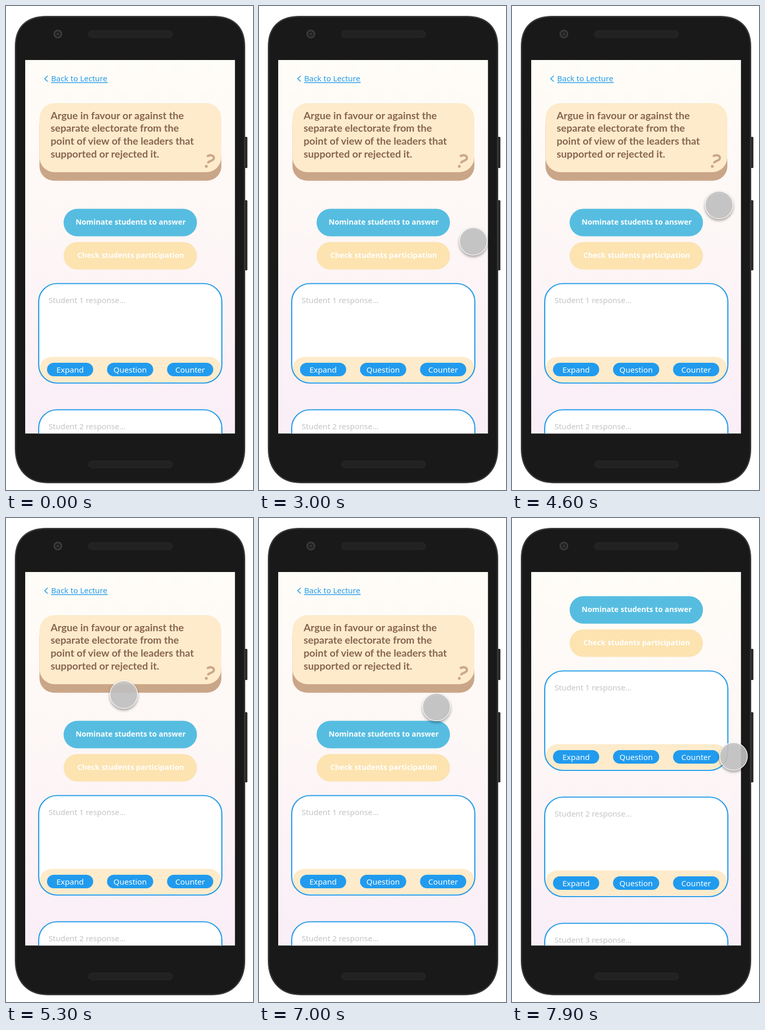
Write an HTML page that moves like this. It is 476 px wide and 932 px high and loops after 8 s.

```html
<!DOCTYPE html>
<html lang="en">
<head>
<meta charset="utf-8">
<title>Lecture question</title>
<style>
  html, body { margin: 0; width: 100%; height: 100%; overflow: hidden; background: #fff; }
  svg { display: block; width: 476px; height: 932px; }
  text { font-family: "Noto Sans", sans-serif; font-size: 15px; }
  .ask { font-family: Lato, sans-serif; font-size: 19.55px; font-weight: 700; fill: #886550; }
  .bold { font-size: 14.25px; font-weight: 700; }
  .mid { text-anchor: middle; fill: #fff; }
  .hint { fill: #c4c4c4; }
  .link { fill: #229bea; }
  #dot { filter: drop-shadow(0 3px 2.5px rgba(0, 0, 0, .4)); }
</style>
</head>
<body>
<svg viewBox="0 0 476 932">
  <defs>
    <linearGradient id="sky" x1="0" y1="0" x2="0" y2="1">
      <stop offset="0" stop-color="#fffdf8"/>
      <stop offset=".5" stop-color="#fdf6f6"/>
      <stop offset="1" stop-color="#faeef7"/>
    </linearGradient>
    <clipPath id="view"><rect x="37" y="104" width="404.5" height="719.3"/></clipPath>
  </defs>

  <g fill="#292929">
    <rect x="456" y="252" width="9.2" height="60" rx="1.5"/>
    <rect x="456" y="374" width="9.2" height="135" rx="1.5"/>
  </g>
  <path fill="#191919" stroke="#383838" stroke-width="2.4"
    d="M78 20.2H400C438 20.2 459.8 40 459.8 78V852C459.8 893 436 917.8 398 917.8H80C42 917.8 18.2 893 18.2 852V78C18.2 40 40 20.2 78 20.2Z"/>
  <g fill="#222" stroke="#2a2a2a">
    <rect x="159" y="47.5" width="162" height="13.5" rx="6.7"/>
    <rect x="159" y="876" width="162" height="13.5" rx="6.7"/>
  </g>
  <circle cx="100" cy="54" r="7" fill="#202020" stroke="#3b3b3b" stroke-width="3"/>
  <circle cx="100" cy="54" r="2.6" fill="#343434"/>

  <g clip-path="url(#view)">
    <rect x="37" y="104" width="404.5" height="720" fill="url(#sky)"/>
    <g id="page"></g>
  </g>
  <circle id="dot" r="26.7" fill="#c9c8c8" fill-opacity=".87" stroke="#fff" stroke-width="1.2"/>
</svg>
<script>
  const LOOP = 8000, STEP = 100, ENTER = 2800, SCROLL = 7700;
  const $ = id => document.getElementById(id);
  const page = $("page"), dot = $("dot");

  const box = (x, y, w, h, r, fill, more = "") =>
    `<rect x="${x}" y="${y}" width="${w}" height="${h}" rx="${r}" fill="${fill}" ${more}/>`;
  const text = (cls, x, y, s) => `<text class="${cls}" x="${x}" y="${y}">${s}</text>`;

  const back = `<path d="M80.5 134.5L74.5 140L80.5 145.5M87 147.5H196"
    fill="none" stroke="#229bea" stroke-width="1.6"/>` + text("link", 87, 145.4, "Back to Lecture");

  const lines = [
    "Argue in favour or against the",
    "separate electorate from the",
    "point of view of the leaders that",
    "supported or rejected it."
  ];
  const question =
    box(64.5, 200, 350.5, 136.5, 28, "#caa688") +
    box(64.5, 187, 350.5, 133, 29, "#fdebcb") +
    lines.map((s, i) => text("ask", 86, 217.5 + i * 24.7, s)).join("") +
    `<path d="M387.5 290C392 285.5 402 287 400.5 293.5C399 299.5 390 297 389.2 303"
      fill="none" stroke="#caa688" stroke-width="4.2"/>
     <circle cx="386" cy="308.8" r="2.8" fill="#caa688"/>`;

  const button = (y, fill, s) =>
    box(111, y, 257, 53, 26.5, fill) + text("bold mid", 240.3, y + 30.4, s);

  const pill = (s, i) => {
    const x = 79 + i * 115.7;
    return box(x, 153, 89, 26, 13, "#219bee") + text("mid", x + 44.5, 171.5, s);
  };

  const card = n => `<g transform="translate(0 ${291 + n * 243})">` +
    box(63, 0.5, 353, 191.5, 35, "#fff") +
    `<path d="M65 163Q67 141.5 92 141.5H388Q412 141.5 414.5 163Q412 190.5 381 190.5H98Q67 190.5 65 163Z" fill="#fdebcb"/>` +
    box(63, 0.5, 353, 191.5, 35, "none", 'stroke="#259be8" stroke-width="2.2"') +
    text("hint", 82, 37.5, `Student ${n} response...`) +
    ["Expand", "Question", "Counter"].map(pill).join("") + "</g>";

  page.innerHTML = back + question +
    button(390.5, "#56bde1", "Nominate students to answer") +
    button(454.5, "#fce3b0", "Check students participation") +
    [1, 2, 3].map(card).join("");

  // Pointer turns: time, x, y
  const turns = [
    [ENTER, 466, 480], [3000, 413, 453], [3400, 94, 336], [4000, 200, 212],
    [4600, 399, 383], [4900, 92, 310], [5100, 370, 240], [5300, 227, 340],
    [5800, 376, 362], [6200, 222, 392], [6500, 222, 392], [7000, 342, 364],
    [7400, 427, 459]
  ];

  // Speed through a turn; zero at rests and at both ends
  function speed(i, k) {
    const a = turns[i - 1], b = turns[i], c = turns[i + 1];
    if (!a || !c || a[k] === b[k] || b[k] === c[k]) return 0;
    return (c[k] - a[k]) / (c[0] - a[0]);
  }

  function along(t, k) {
    const i = turns.findIndex(p => p[0] > t) - 1;
    if (i < 0) return turns[turns.length - 1][k];
    const a = turns[i], b = turns[i + 1], d = b[0] - a[0];
    const u = (t - a[0]) / d, v = 1 - u;
    return v * v * (1 + 2 * u) * a[k] + u * u * (3 - 2 * u) * b[k]
      + d * u * v * (v * speed(i, k) - u * speed(i + 1, k));
  }

  // A flick that slows down slightly
  function scroll(t) {
    const n = Math.max(0, (t - SCROLL) / STEP);
    return 132 * n - 6 * n * n;
  }

  function draw(now) {
    const t = Math.floor((now % LOOP) / STEP) * STEP;
    page.setAttribute("transform", `translate(0 ${-scroll(t)})`);
    dot.style.display = t < ENTER ? "none" : "";
    if (t >= ENTER) dot.setAttribute("transform", `translate(${along(t, 1)} ${along(t, 2)})`);
  }

  const start = performance.now();
  function tick() {
    draw(performance.now() - start);
    requestAnimationFrame(tick);
  }
  tick();
</script>
</body>
</html>
```
